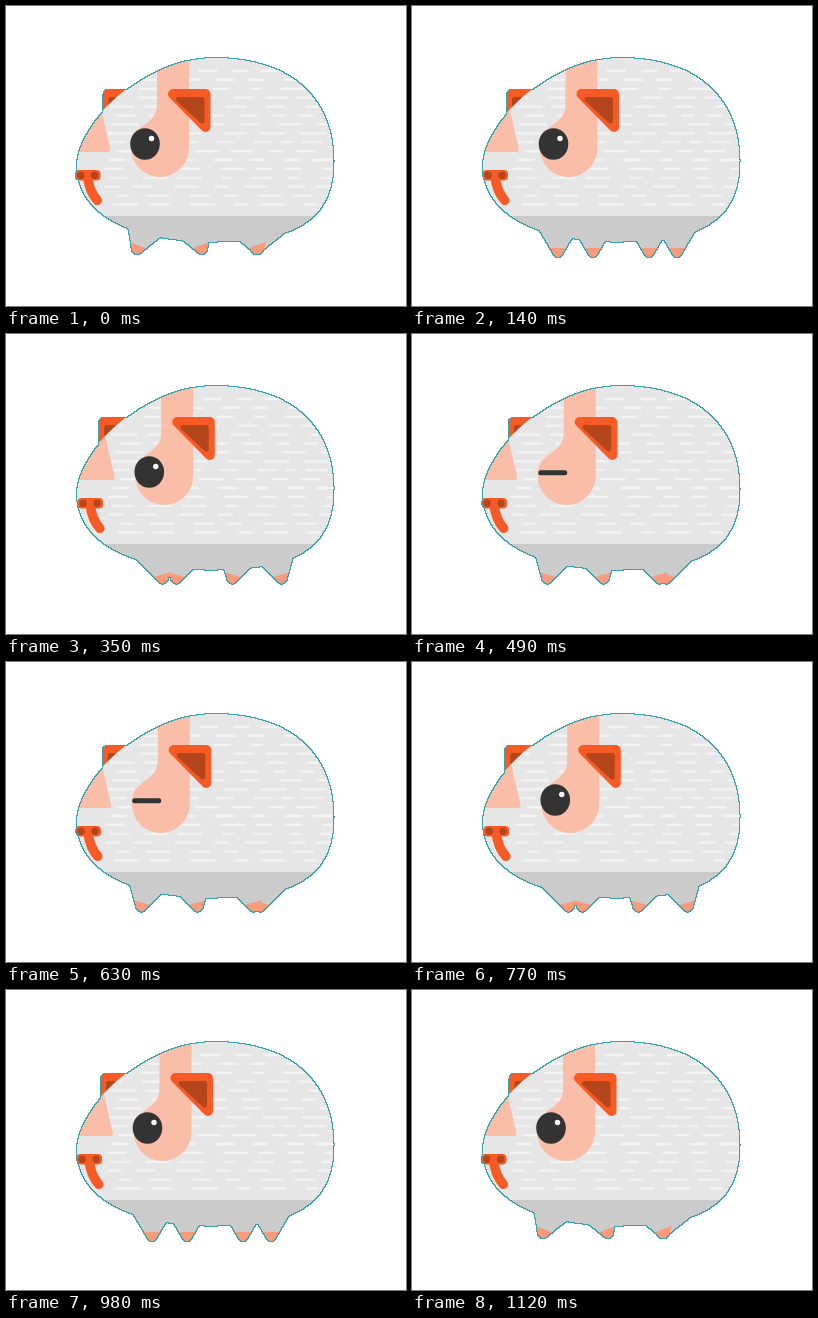
These frames come from a looping animation (400 by 300 pixels, 1190 ms). An HTML page:

```html
<!DOCTYPE html>
<html>
<head>
<meta charset="utf-8">
<title>Walking pig</title>
<style>
  html, body { margin: 0; height: 100%; overflow: hidden; background: #fff; }
  svg { display: block; }
</style>
</head>
<body>
<svg width="400" height="300" viewBox="0 0 400 300">
  <defs>
    <path id="body" d="M70 160C70 118 136 51 208 51C289 51 328.5 94 328.5 155C328.5 219 286 236.5 205 236.5C126 236.5 70 210 70 160Z"/>
    <clipPath id="skin"><use href="#body"/></clipPath>
    <linearGradient id="coat" gradientUnits="userSpaceOnUse" x1="0" y1="110" x2="0" y2="310">
      <stop offset=".5" stop-color="#e6e6e6"/>
      <stop offset=".5" stop-color="#cbcbcb"/>
    </linearGradient>
    <!-- hard one-pixel teal edge just inside the silhouette -->
    <filter id="rim" filterUnits="userSpaceOnUse" x="0" y="0" width="400" height="300" color-interpolation-filters="sRGB">
      <feComponentTransfer in="SourceAlpha" result="solid">
        <feFuncA type="discrete" tableValues="0 1"/>
      </feComponentTransfer>
      <feMorphology operator="erode" radius="1" result="inner"/>
      <feFlood flood-color="#3aa3aa"/>
      <feComposite in2="solid" operator="in" result="edge"/>
      <feComposite in="SourceGraphic" in2="inner" operator="in" result="fill"/>
      <feMerge><feMergeNode in="edge"/><feMergeNode in="fill"/></feMerge>
    </filter>
    <g id="leg">
      <path d="M-26 10L-5.1 45.1A6 6 0 0 0 5.1 45.1L26 10Z" fill="#cbcbcb"/>
      <path d="M-9.4 38L-5.1 45.1A6 6 0 0 0 5.1 45.1L9.4 38Z" fill="#f89b7c"/>
    </g>
    <g id="ear" stroke-linejoin="round">
      <path d="M167 88H199.5V121Z" fill="#f65b25" stroke="#f65b25" stroke-width="10"/>
      <path d="M172.5 93.5H196V115Z" fill="#b5451a" stroke="#b5451a" stroke-width="5"/>
    </g>
  </defs>

  <g filter="url(#rim)">
    <g id="farEar"><use href="#ear" transform="matrix(-1 0 0 1 301 0)"/></g>
    <g id="legs"></g>
    <use href="#body" fill="url(#coat)"/>

    <g clip-path="url(#skin)">
      <path id="fur" stroke="#f3f3f3" stroke-width="2.3" stroke-linecap="round"/>
      <g class="face" fill="#f9bda8">
        <path d="M183 40V142A29 29 0 0 1 125 142C125 116 151 122 151 98V40Z"/>
        <path d="M55 146H102q3 0 2.3-3L94 98H55Z"/>
      </g>
    </g>

    <g class="face">
      <use href="#ear"/>
      <g id="open">
        <ellipse cx="139" cy="138" rx="14.8" ry="15.8" fill="#333"/>
        <circle cx="145.5" cy="132.5" r="2.7" fill="#fff"/>
      </g>
      <path id="shut" d="M128 138.7H152" stroke="#333" stroke-width="5" stroke-linecap="round"/>
    </g>

    <g id="snout">
      <path d="M81.5 170Q83 185 91.3 194.3" fill="none" stroke="#f65b25" stroke-width="9.5" stroke-linecap="round"/>
      <rect x="69" y="164" width="25.5" height="10.5" rx="4" fill="#f65b25"/>
      <g fill="#b5451a"><circle cx="74.7" cy="169.3" r="3.7"/><circle cx="88.6" cy="169.3" r="3.7"/></g>
    </g>
  </g>
</svg>
<script>
const $ = id => document.getElementById(id);
const STEP = 70, STEPS = 17;

// hips, far leg of each pair first; the outer legs swing against the inner ones
const hips = [265, 237, 181, 146];
$('legs').innerHTML = hips.map(() => '<use href="#leg"/>').join('');

let seed = 11;
const random = () => (seed = seed * 16807 % 2147483647) / 2147483647;

let dashes = '';
for (let y = 65; y < 204; y += 8.9) {
  for (let x = 95 + 20 * random(); x < 320;) {
    const length = 9 + 18 * random();
    dashes += `M${x} ${y}h${length}`;
    x += length + 11 + 13 * random();
  }
}
$('fur').setAttribute('d', dashes);

const shift = (el, x) => el.setAttribute('transform', `translate(${x} 0)`);
const headParts = [...document.querySelectorAll('.face'), $('fur')];

function draw(now) {
  const k = Math.floor(now / STEP) % STEPS;
  const swing = Math.cos(k * Math.PI / 4);
  const turn = (1 - swing) / 2;

  hips.forEach((x, i) => {
    const angle = 21 * swing * (i % 3 ? -1 : 1);
    $('legs').children[i].setAttribute('transform', `translate(${x} 204) rotate(${angle})`);
  });
  headParts.forEach(el => shift(el, 5 * turn));
  shift($('farEar'), -5 * turn);
  shift($('snout'), 3 * turn);

  const blink = Math.abs(k - 8) <= 1;
  $('open').style.display = blink ? 'none' : '';
  $('shut').style.display = blink ? '' : 'none';
}

const start = performance.now();
function tick() {
  draw(performance.now() - start);
  requestAnimationFrame(tick);
}
tick();
</script>
</body>
</html>
```
